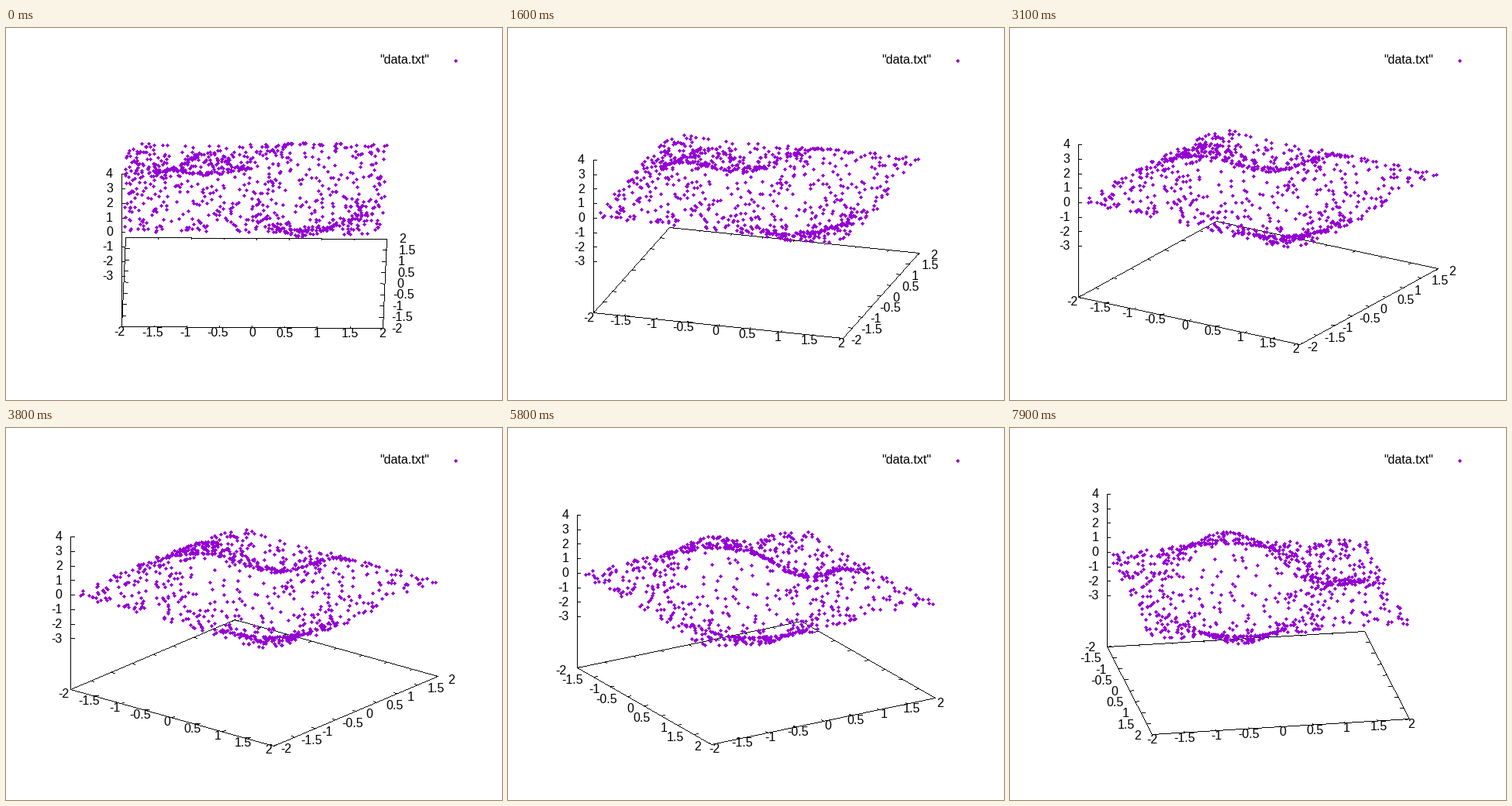
A matplotlib script for the animation above (8000 ms loop, 640 by 480 pixels).

```python
import numpy as np
import matplotlib.pyplot as plt
from matplotlib.animation import FuncAnimation
from matplotlib.collections import PolyCollection

W, H, DPI = 640, 480, 100
PX = 72 / DPI
FRAMES, INTERVAL = 80, 100
CX, CY = 320, 328.5          # centre of the base plane
UNIT = 84.25                 # pixels per x or y unit
TILT = np.cos(np.radians(70))
ZUNIT, ZMIN, ZMAX = 18.74, -3, 4
ZLIFT = 65.6                 # gap between the base and ZMIN
VIOLET = "#9400d3"
FONT = dict(family="Liberation Sans", size=16 * PX, color="black", va="baseline")
SPACE = 4.45                 # width of a blank
TICKS = np.arange(-2, 2.1, 0.5)
ZTICKS = np.arange(ZMIN, ZMAX + 1)

# Unsmoothed fills light every pixel they touch, so shapes stay inside their pixels.
DIAMOND = 1.8 * np.array([(1, 0), (0, 1), (-1, 0), (0, -1)])
PIXEL = 0.3 * np.array([(1, 1), (-1, 1), (-1, -1), (1, -1)])


def surface(x, y):
    ridge = (2.65 * np.exp(-1.3 * (y + 0.4) ** 2)
             - 1.1 * np.exp(-4 * (y - 1.25) ** 2))
    return -x * np.exp(-x * x) / 0.4289 * ridge + 0.4 * np.exp(-x * x - y * y)


rng = np.random.default_rng(11)
px, py = rng.uniform(-2, 2, (2, 900))
pz = surface(px, py)


def base(x, y, c, s):
    return np.array([CX + UNIT * (x * c + y * s),
                     CY + UNIT * TILT * (x * s - y * c)])


def lift(z):
    return ZLIFT + ZUNIT * (z - ZMIN)


def stamp(shape, points):
    return np.round(points)[:, None, :] + shape


def trace(p, q):
    """Pixel centres of a one-pixel line from p to q."""
    p, q = np.round(p), np.round(q)
    steps = int(np.abs(q - p).max()) + 1
    return np.linspace(p, q, steps)


def add_shapes(color, verts=(), zorder=1):
    shapes = PolyCollection(verts, facecolors=color, edgecolors="none", linewidths=0,
                            antialiaseds=False, zorder=zorder)
    return ax.add_collection(shapes, autolim=False)


def make_labels(values):
    return [ax.text(0, 0, f"{v:g}", zorder=3, **FONT) for v in values]


fig = plt.figure(figsize=(W / DPI, H / DPI), dpi=DPI, facecolor="white")
ax = fig.add_axes([0, 0, 1, 1])
ax.set_xlim(-0.5, W - 0.5)
ax.set_ylim(H - 0.5, -0.5)
ax.axis("off")

lines = add_shapes("black")
dots = add_shapes(VIOLET, zorder=2)
add_shapes(VIOLET, stamp(DIAMOND, np.array([(580, 42)])))
ax.text(546, 46, '"data.txt"', ha="right", **FONT)
xlabels, ylabels, zlabels = map(make_labels, (TICKS, TICKS, ZTICKS))


def place(label, value, pos, out, side):
    """Put a label outside its tick, padded by blanks like a number field."""
    x = pos[0] + 10.8 * out[0]
    y = pos[1] + 20.5 * out[1]
    lead = SPACE if value >= 0 else 0
    if abs(out[0]) < 0.76:
        label.set_ha("center")
        x += (lead - SPACE) / 2
    elif side == "left":
        label.set_ha("right")
        x -= SPACE
    else:
        label.set_ha("left")
        x += lead
    label.set_position((x, y + 4.8))


def draw(i):
    a = np.radians(i + 1)
    c, s = np.cos(a), np.sin(a)
    xdir = np.array([c, TILT * s])
    ydir = np.array([s, -TILT * c])

    corners = [base(x, y, c, s) for x, y in ((-2, -2), (2, -2), (2, 2), (-2, 2))]
    segs = [(corners[k], corners[(k + 1) % 4]) for k in range(4)]
    for v, xl, yl in zip(TICKS, xlabels, ylabels):
        front, back = base(v, -2, c, s), base(v, 2, c, s)
        right, left = base(2, v, c, s), base(-2, v, c, s)
        segs += [(front, front + 5 * ydir), (back, back - 5 * ydir),
                 (right, right - 5 * xdir), (left, left + 5 * xdir)]
        place(xl, v, front, -ydir, "left")
        place(yl, v, right, xdir, "right")

    x0, y0 = corners[0]
    segs.append((corners[0], (x0, y0 - lift(ZMAX))))
    for v, zl in zip(ZTICKS, zlabels):
        y = y0 - lift(v)
        segs.append(((x0, y), (x0 + 4.5, y)))
        zl.set_ha("right")
        zl.set_position((x0 - 11, y + 4.6))
    lines.set_verts(stamp(PIXEL, np.vstack([trace(p, q) for p, q in segs])))

    sx, sy = base(px, py, c, s)
    dots.set_verts(stamp(DIAMOND, np.column_stack([sx, sy - lift(pz)])))
    return [lines, dots, *xlabels, *ylabels, *zlabels]


anim = FuncAnimation(fig, draw, frames=FRAMES, interval=INTERVAL,
                     repeat=True, repeat_delay=0, blit=False)
plt.show()
```
